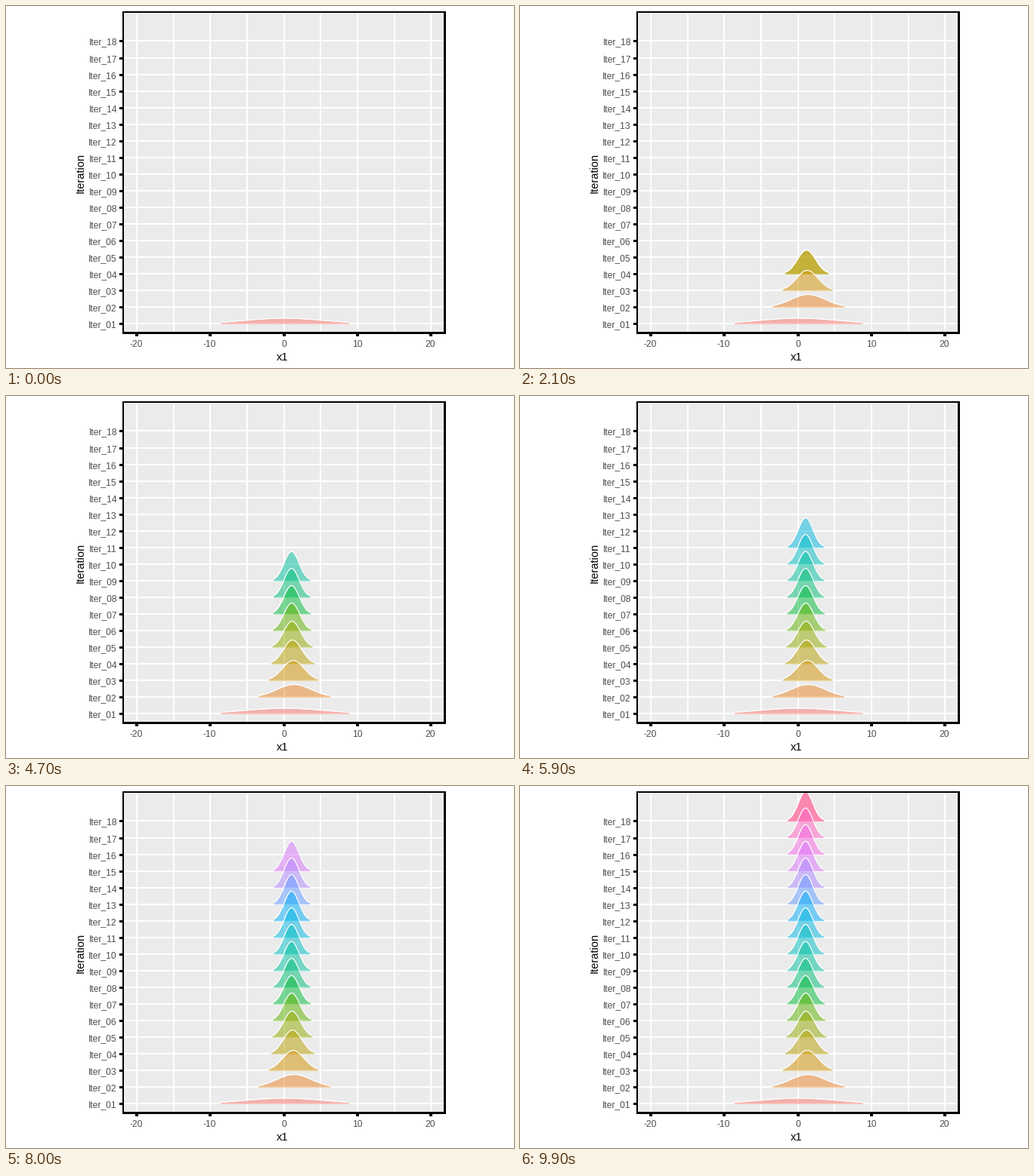
Write a matplotlib script that moves like this. It is 672x480 px and loops after 10 s.

```python
import numpy as np
import matplotlib.pyplot as plt
from matplotlib.animation import FuncAnimation
from matplotlib.patches import Rectangle

W, H, DPI = 672, 480, 96
PX = 72 / DPI                      # points per pixel
N = 18
X0, X_UNIT = 367.7, 9.72           # pixel of x = 0, pixels per unit
Y0, Y_STEP = 421.32, 22.05         # baseline of the lowest ridge, row spacing
LEFT, TOP, RIGHT, BOTTOM = 155, 8, 580, 433
PEAK = 39.3                        # height of a ridge with sd 1

HEIGHTS = [7.3, 16.7, 26.6, 31.6, 34.5, 36.5, 37.6, 38.4, 38.7] + [PEAK] * 9
CENTRES = [368.2, 381, 380, 379, 378.4, 378] + [377.7] * 12

plt.rcParams["font.family"] = "Liberation Sans"


def hcl(hue, chroma=100, lum=65):
    """Polar LUV colour to sRGB."""
    a = np.radians(hue)
    u = chroma * np.cos(a) / (13 * lum) + 0.1978398
    v = chroma * np.sin(a) / (13 * lum) + 0.4683363
    y = ((lum + 16) / 116) ** 3
    x = 9 * y * u / (4 * v)
    z = -x / 3 - 5 * y + 3 * y / v
    lin = np.array([[3.240479, -1.537150, -0.498535],
                    [-0.969256, 1.875992, 0.041556],
                    [0.055648, -0.204043, 1.057311]]) @ [x, y, z]
    lin = np.clip(lin, 0, 1)
    return tuple(np.where(lin > 0.00304,
                          1.055 * lin ** (1 / 2.4) - 0.055, 12.92 * lin))


def appears(k):
    """Tick (100 ms) at which ridge k comes in."""
    if k == 0:
        return 0
    return 6 * k - 1 if k < 12 else 5 * k + 10


def doubles(k):
    """Tick at which ridge k is laid over itself."""
    return 6 * k + 3 if k < 12 else 5 * k + 14


fig = plt.figure(figsize=(W / DPI, H / DPI), dpi=DPI, facecolor="white")
ax = fig.add_axes([0, 0, 1, 1])
ax.set_xlim(0, W)
ax.set_ylim(H, 0)
ax.axis("off")


def box(x0, y0, x1, y1, color, z):
    ax.add_patch(Rectangle((x0, y0), x1 - x0, y1 - y0, facecolor=color,
                           edgecolor="none", antialiased=False, zorder=z))


def label(x, y, s, px, color="#4D4D4D", **kw):
    ax.text(x, y, s, fontsize=px * PX, color=color, va="baseline", **kw)


# panel, grid, ticks and labels
box(LEFT, TOP, RIGHT, BOTTOM, "#EBEBEB", 0)
for x in range(-20, 21, 5):
    gx = round(X0 + x * X_UNIT)
    box(gx - 1, TOP, gx + 1, BOTTOM, "white", 1)
    if x % 10 == 0:
        box(gx - 2, BOTTOM, gx + 2, BOTTOM + 5, "black", 50)
        label(gx - 0.5, 452, str(x), 12, ha="center")
for k in range(N):
    gy = round(Y0 - k * Y_STEP)
    box(LEFT, gy - 1, RIGHT, gy + 1, "white", 1)
    box(LEFT - 5, gy - 1, LEFT, gy + 2, "black", 50)
    label(147, gy + 5, f"Iter_{k + 1:02d}", 12, ha="right")

box(LEFT - 1, TOP - 1, RIGHT + 2, TOP + 1, "black", 50)
box(LEFT - 1, BOTTOM - 1, RIGHT + 2, BOTTOM + 2, "black", 50)
box(LEFT - 1, TOP - 1, LEFT + 1, BOTTOM + 2, "black", 50)
box(RIGHT - 1, TOP - 1, RIGHT + 2, BOTTOM + 2, "black", 50)

label(366, 470, "x1", 14.67, "black", ha="center")
label(103, 221, "Iteration", 14.67, "black", ha="center", rotation=90,
      rotation_mode="anchor")

clip = Rectangle((LEFT, TOP + 1), RIGHT - LEFT, BOTTOM - TOP - 1,
                 transform=ax.transData)


def ridge(k):
    """Filled bell with a white top line, cut where it gets very low."""
    h = HEIGHTS[k]
    sd = X_UNIT * PEAK / h
    reach = sd * np.sqrt(2 * np.log(h / (0.05 * PEAK)))
    t = np.linspace(-reach, reach, 121)
    base = Y0 - k * Y_STEP
    top = base - h * np.exp(-0.5 * (t / sd) ** 2)
    z = 10 + N - k                 # lower ridges lie in front
    fill = ax.fill_between(t + CENTRES[k], base, top, color=hcl(15 + 20 * k),
                           alpha=0.5, linewidth=0, zorder=z)
    line, = ax.plot(t + CENTRES[k], top, color="white", lw=1.2 * PX,
                    solid_capstyle="butt", zorder=z + 0.5)
    for art in (fill, line):
        art.set_clip_path(clip)
    return fill, line


ridges = [ridge(k) for k in range(N)]
copies = [ridge(k) for k in range(N)]


def draw(i):
    for k in range(N):
        for art in ridges[k]:
            art.set_visible(i >= appears(k))
        for art in copies[k]:
            art.set_visible(doubles(k) <= i < appears(k + 1))
    return [art for pair in ridges + copies for art in pair]


anim = FuncAnimation(fig, draw, frames=100, interval=100, init_func=lambda: draw(0),
                     repeat=True, repeat_delay=0, blit=False)
plt.show()
```
